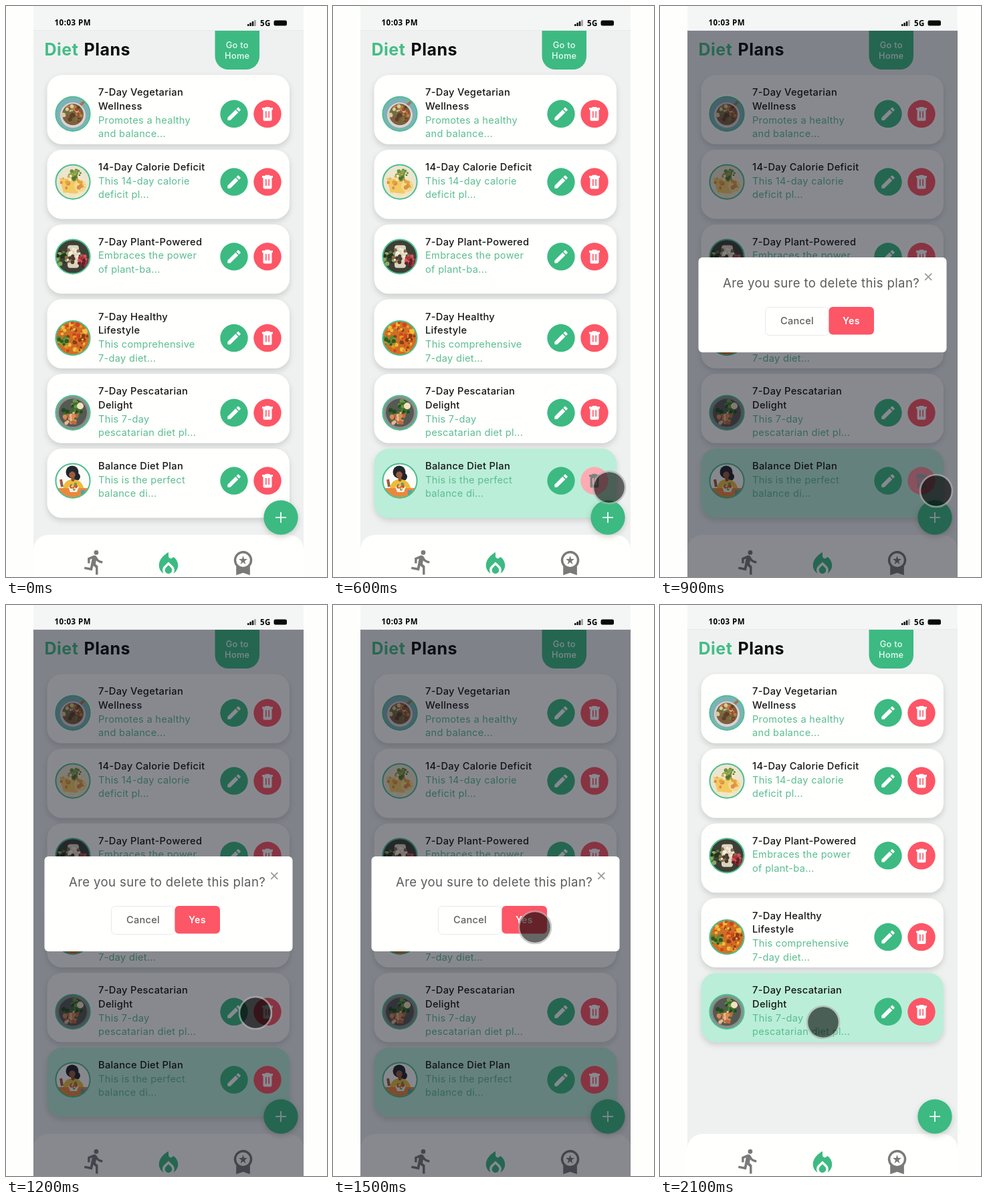
These frames come from a looping animation (480x854 px, 2.2 s). An HTML page:

```html
<!DOCTYPE html>
<html lang="en">
<head>
<meta charset="utf-8">
<title>Diet Plans</title>
<style>
html, body { margin: 0; width: 100%; height: 100%; overflow: hidden; background: #fefefc; }
svg { display: block; width: 100%; height: 100%; }
text { font-family: Inter, "Open Sans", sans-serif; letter-spacing: .02em; white-space: pre; }
.status { font: 700 11.5px "Noto Sans", sans-serif; letter-spacing: .5px; }
.card { filter: drop-shadow(0 4px 4px rgba(0, 0, 0, .14)); }
.fab { filter: drop-shadow(0 3px 4px rgba(0, 0, 0, .18)); }
</style>
</head>
<body>
<svg id="stage" viewBox="0 0 480 854"></svg>
<script>
const LOOP = 2200, STEP = 100;
const GREEN = '#3cba82', RED = '#fd5666', GREY = '#7a7a7a';
const stage = document.getElementById('stage');

const rect = (x, y, w, h, r, fill, more = '') =>
  `<rect x="${x}" y="${y}" width="${w}" height="${h}" rx="${r}" fill="${fill}" ${more}/>`;
const circle = (x, y, r, fill, more = '') =>
  `<circle cx="${x}" cy="${y}" r="${r}" fill="${fill}" ${more}/>`;
const path = (d, fill, more = '') => `<path d="${d}" fill="${fill}" ${more}/>`;
const text = (s, x, y, size, fill, weight = 400, more = '') =>
  `<text x="${x}" y="${y}" font-size="${size}" fill="${fill}" font-weight="${weight}" ${more}>${s}</text>`;
const centered = (s, x, y, size, fill, weight) => text(s, x, y, size, fill, weight, 'text-anchor="middle"');
const group = (x, y, body, scale = 1) => `<g transform="translate(${x} ${y}) scale(${scale})">${body}</g>`;
const rgb = c => `rgb(${c.map(Math.round)})`;
const mix = (a, b, w) => rgb(a.map((v, i) => v + (b[i] - v) * w));

const ICON = {
  pencil: 'M3 17.25V21h3.75L17.81 9.94l-3.75-3.75zM20.71 7.04a1 1 0 0 0 0-1.41l-2.34-2.34a1 1 0 0 0-1.41 0l-1.83 1.83 3.75 3.75z',
  bin: 'M-8-9h4l1.2-1.2h5.6L4-9h4v3H-8zM-6.5-6.5H6.5V8.5a2 2 0 0 1-2 2H-4.5a2 2 0 0 1-2-2z',
  run: 'M13.49 5.48a2 2 0 1 0 0-4 2 2 0 0 0 0 4zm-3.6 13.9l1-4.4 2.1 2v6h2v-7.5l-2.1-2 .6-3c1.3 1.5 3.3 2.5 5.5 2.5v-2c-1.9 0-3.5-1-4.3-2.4l-1-1.6c-.4-.6-1-1-1.7-1-.3 0-.5.1-.8.1l-5.2 2.2v4.7h2v-3.4l1.8-.7-1.6 8.1-4.9-1-.4 2z',
  flame: 'M12 12.9l-2.13 2.09A2.9 2.9 0 0 0 9 17.06C9 18.68 10.35 20 12 20s3-1.32 3-2.94c0-.78-.31-1.52-.87-2.07zM16 6l-.44.55C14.38 8.02 12 7.19 12 5.3V2S4 6 4 13c0 2.92 1.56 5.47 3.89 6.86A4.8 4.8 0 0 1 7 17.06c0-1.32.52-2.56 1.47-3.5L12 10.1l3.53 3.47A4.9 4.9 0 0 1 16.15 19.82c1.89-1.15 3.29-3.06 3.71-5.3.66-3.55-1.07-6.9-3.86-8.52z',
  award: 'M9.68 13.69L12 11.93l2.31 1.76-.88-2.85L15.75 9h-2.84L12 6.19 11.09 9H8.25l2.31 1.84zM20 10a8 8 0 1 0-14 5.28V23l6-2 6 2v-7.72A8 8 0 0 0 20 10zm-8-6a6 6 0 1 1 0 12 6 6 0 0 1 0-12z'
};

// Scatter of small food pieces within radius r
function pieces(colors, n, r, seed, x = 0, y = 0) {
  const rnd = () => (seed = seed * 16807 % 2147483647) / 2147483647;
  let out = '';
  for (let i = 0; i < n; i++) {
    const a = rnd() * 6.283, d = Math.sqrt(rnd()) * r;
    out += circle((x + Math.cos(a) * d).toFixed(1), (y + Math.sin(a) * d).toFixed(1),
      (1.4 + rnd() * 2).toFixed(1), colors[i % colors.length]);
  }
  return out;
}
const disc = fill => circle(0, 0, 26, fill);

const photos = [
  disc('#7fb0b8') + path('M10-12L21-22', 'none', 'stroke="#a9744e" stroke-width="4"') +
    circle(0, 2, 19, '#d9d6ce') + circle(0, 1, 16, '#7d6040') +
    pieces(['#b5823f', '#6b7d3c', '#d8c9a0', '#a8482c', '#5c4029'], 40, 14, 77, 0, 1),
  disc('#ece5cf') + path('M-20-6L4-3 8 18-14 16z', '#f2ca62') + circle(11, 6, 9, '#f4d98c') +
    pieces(['#6f8f3c', '#89a34d', '#4f7431'], 26, 9, 31, 3, -12) +
    pieces(['#e2a53f', '#f7e9bd', '#dd8f48'], 22, 19, 52, 0, 6),
  disc('#3d4036') + rect(-8, -17, 17, 34, 4, '#ddd3bd') +
    pieces(['#557a37', '#8cab5e', '#26311f'], 22, 10, 15, -16, 2) +
    pieces(['#b42f38', '#d4545b', '#5f2027'], 22, 9, 24, 17, 8) +
    pieces(['#f3ecdb', '#8b684a', '#493b2d'], 20, 13, 93),
  disc('#cf6f25') + pieces(['#e99a27', '#d4441f', '#f1bd3d', '#8f3a18'], 60, 23, 41) +
    pieces(['#5d8a32', '#34581f', '#7ca13f'], 20, 9, 63, -16, 4),
  disc('#8a8d8b') + circle(0, 0, 21, '#555954') +
    pieces(['#3f6d2e', '#27481f', '#6d9647'], 44, 14, 19, 0, -4) +
    pieces(['#d98b58', '#c06a3c', '#e7b98c'], 24, 10, 8, -3, 9) + circle(11, -10, 5, '#efe3bd'),
  disc('#fdfcf8') + circle(-1, -13, 9.5, '#20262c') + circle(5, -6, 6, '#20262c') +
    path('M-15 14Q-14-2 0-2T17 14z', '#eebb3c') + rect(-2.5, -6, 5, 7, 2.5, '#8f5135') +
    circle(-1, -9, 4.8, '#9c5b3b') + path('M-16 9L-18-2', 'none', 'stroke="#9c5b3b" stroke-width="4"') +
    rect(-26, 11, 52, 16, 0, '#e9893d') + path('M-7 9H9L6 17H-4z', '#f7f1e4') +
    pieces(['#5c9b5a', '#d9523c', '#f1d36a'], 10, 5, 12, 1, 9) + rect(12, 14, 6, 8, 1, '#5f9fa0')
];

const plans = [
  [['7-Day Vegetarian', 'Wellness'], ['Promotes a healthy', 'and balance...']],
  [['14-Day Calorie Deficit'], ['This 14-day calorie', 'deficit pl...']],
  [['7-Day Plant-Powered'], ['Embraces the power', 'of plant-ba...']],
  [['7-Day Healthy', 'Lifestyle'], ['This comprehensive', '7-day diet...']],
  [['7-Day Pescatarian', 'Delight'], ['This 7-day', 'pescatarian diet pl...']],
  [['Balance Diet Plan'], ['This is the perfect', 'balance di...']]
];

// Linear interpolation through [time, ...values] keys, held at both ends
function track(keys, t) {
  const i = keys.findIndex(k => k[0] >= t);
  if (i < 0) return keys[keys.length - 1].slice(1);
  if (i === 0) return keys[0].slice(1);
  const [a, b] = [keys[i - 1], keys[i]], w = (t - a[0]) / (b[0] - a[0]);
  return a.slice(1).map((v, j) => v + (b[j + 1] - v) * w);
}
const pointer = [[400, 414, 709], [600, 413, 720], [800, 414, 724], [900, 413, 725], [1000, 412, 722],
  [1100, 400, 680], [1300, 346, 540], [1400, 330, 502], [1500, 302, 482], [1600, 293, 480],
  [1700, 276, 555], [1800, 254, 626], [1900, 248, 626], [2100, 244, 624]];
const cardHover = [[0, 255, 255, 253], [100, 233, 252, 247], [300, 186, 238, 216]];
const hoverStart = { 4: 1800, 5: 300 };
const binHover = [[500, 0], [700, 1], [800, 1], [900, .35], [1000, 0]];

function card(i, t, loading) {
  const [title, about] = plans[i];
  const y = 103.3 + i * 111.75, cy = title.length > 1 ? 58 : 48;
  const bin = i === 5 ? track(binHover, t)[0] : 0;
  const binFill = mix([253, 86, 102], [255, 255, 255], bin);
  const fill = i === 3 && loading ? '#fbfcfc' : rgb(track(cardHover, t - (hoverStart[i] ?? LOOP)));
  const lines = [...title, ...about].map((s, n) => n < title.length
    ? text(s, 138, 31.2 + n * 20.7, 14.7, '#161616', 500)
    : text(s, 138, 31 + n * 20.7, 14.6, '#5bbd91')).join('');
  const photo = loading ? '' : `<g clip-path="url(#round)">${photos[i]}</g>`;
  return group(0, y,
    rect(61.5, 0, 362.5, 103.5, 22, fill, 'class="card"') + lines +
    group(100, cy, photo + circle(0, 0, 25.6, 'none', 'stroke="#4abf90" stroke-width="2"')) +
    circle(341, cy, 20.7, GREEN) + group(328.1, cy - 12.9, path(ICON.pencil, '#fff'), 1.08) +
    circle(391, cy, 20.7, binFill) +
    group(391, cy, path(ICON.bin, mix([255, 255, 255], [0, 0, 0], bin)) +
      path('M-2.2-4V6M2.2-4V6', 'none', `stroke="${binFill}" stroke-width="1.6"`)));
}

function header(loading) {
  const link = loading
    ? rect(312, 40, 67, 50.5, 3, '#cae9dc') +
      centered('Go to', 345.5, 68.5, 16, '#5a5890') + centered('Home', 345.5, 84, 16, '#5a5890')
    : path('M312.5 37H379V75a20 20 0 0 1-20 20H332.5a20 20 0 0 1-20-20z', GREEN) +
      centered('Go to', 345.7, 62.5, 12.8, '#e9fbf2', 500) + centered('Home', 345.7, 79, 12.8, '#e9fbf2', 500);
  return text('Diet', 57.5, 74, 25, '#43bd85', 700) + text('Plans', 116.5, 74, 25, '#0c0c0c', 700) + link;
}

const statusBar = rect(41, 0, 404, 37, 0, '#f4f6f6') + rect(41, 36, 404, 1, 0, '#e6e9ea') +
  '<text class="status" x="72.5" y="28.5">10:03 PM</text><text class="status" x="380" y="29.5">5G</text>' +
  [0, 1, 2, 3].map(n => rect(361 + n * 3.4, 27 - n * 2, 2.5, 3 + n * 2, .6, n < 3 ? '#111' : '#999')).join('') +
  rect(400.5, 21.5, 19.5, 8, 2.5, '#0a0a0a');

const nav = path('M41 854V813a22 22 0 0 1 22-22H423a22 22 0 0 1 22 22V854z', '#fffffd') +
  group(112, 811.5, path(ICON.run, GREY), 1.7) +
  group(221.6, 813.4, path(ICON.flame, GREEN), 1.78) +
  group(333.9, 811.6, path(ICON.award, GREY), 1.72);

const addButton = circle(411, 765, 25.7, GREEN, 'class="fab"') +
  path('M403 765H419M411 757V773', 'none', 'stroke="#e4f6ee" stroke-width="2"');

const dialog = rect(41, 37, 404, 817, 0, 'rgb(14,16,30)', 'opacity=".49"') +
  rect(57.5, 376, 371, 142, 6, '#fffffe') +
  text('Are you sure to delete this plan?', 94, 421, 18.6, '#5c5c5c') +
  path('M396.2 400.2l10 10m0-10l-10 10', 'none', 'stroke="#999" stroke-width="1.7"') +
  rect(157.5, 450.5, 95, 42, 6, '#fffffe', 'stroke="#e9e9e9"') +
  centered('Cancel', 205, 476, 14.6, '#606060', 500) +
  rect(252.5, 450, 67.5, 41.5, 6, RED) + centered('Yes', 286, 476, 14.2, '#fff', 600);

const clip = '<clipPath id="round"><circle r="25"/></clipPath>';

function draw(t) {
  const asking = t >= 900 && t < 1700, loading = t >= 1700 && t < 1900;
  let out = clip + rect(0, 0, 480, 854, 0, '#fefefc') + rect(41, 0, 404, 854, 0, '#eff1f1') +
    statusBar + header(loading);
  for (let i = 0; i < (t < 1700 ? 6 : 5); i++) out += card(i, t, loading);
  out += nav + addButton;
  if (asking) out += dialog;
  if (t >= 400) {
    const [x, y] = track(pointer, t);
    out += circle(x, y, 23, '#000', 'fill-opacity=".6"') +
      circle(x, y, 24, 'none', 'stroke="#b0b0b0" stroke-opacity=".65" stroke-width="2.6"');
  }
  stage.innerHTML = out;
}

let shown = -1;
function tick() {
  const t = Math.floor(performance.now() % LOOP / STEP) * STEP;
  if (t !== shown) draw(shown = t);
  requestAnimationFrame(tick);
}
tick();
</script>
</body>
</html>
```
